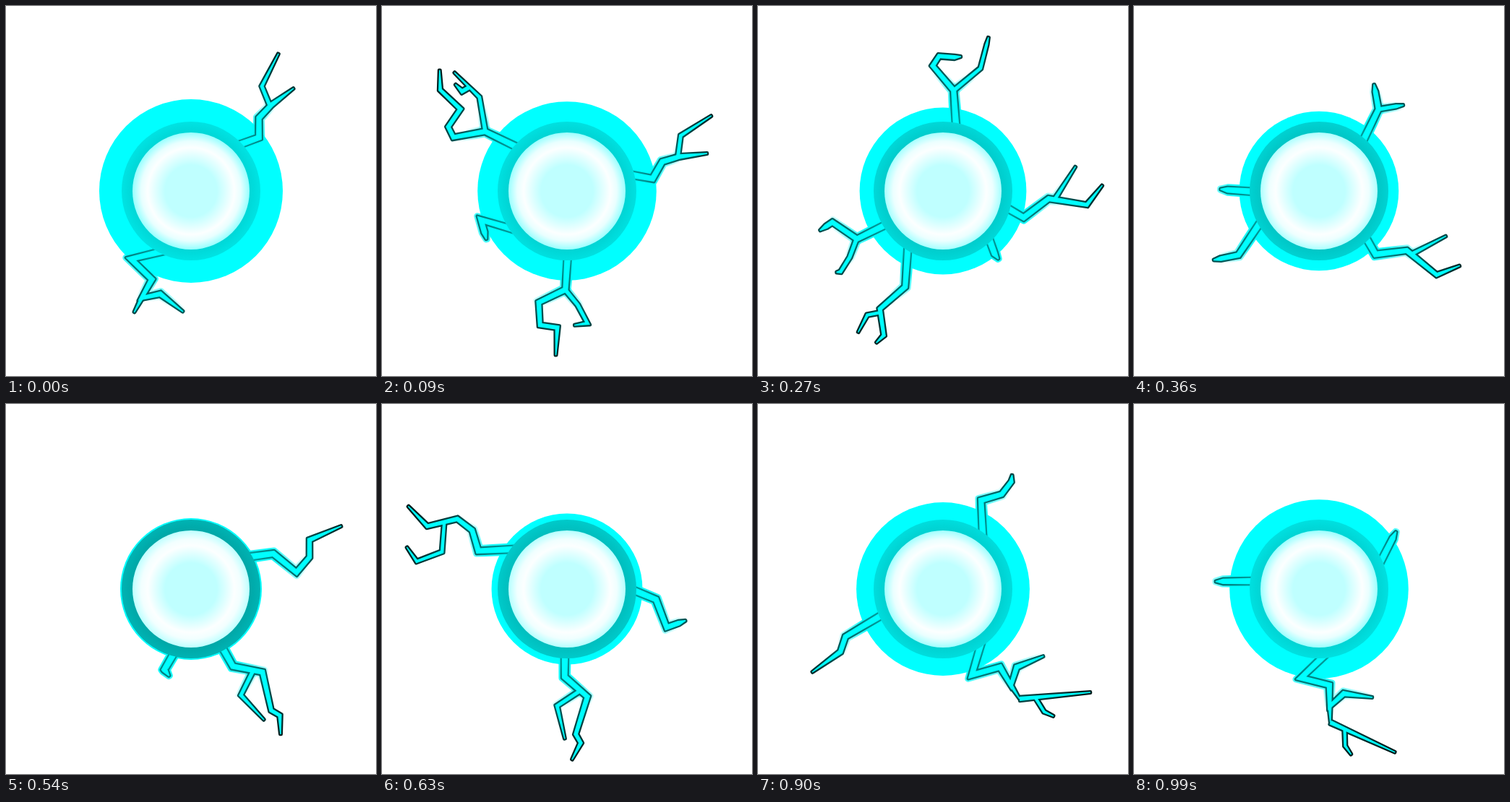
An HTML page with a canvas for the animation above (1.08 s loop, 512 by 512 pixels).

```html
<!DOCTYPE html>
<html lang="en">
<head>
<meta charset="utf-8">
<title>Energy orb</title>
<style>
  html, body { margin: 0; width: 100%; height: 100%; overflow: hidden; background: #fff; }
  canvas { display: block; width: 512px; height: 512px; }
</style>
</head>
<body>
<canvas id="stage" width="512" height="512"></canvas>
<script>
const ctx = document.getElementById('stage').getContext('2d');
const STEP = 90, COUNT = 12, MID = 256, TURN = Math.PI * 2;
const RING = 96, BALL = 81;

// Radial gradient around the orb: stops are [radius, colour].
function radial(outer, ...stops) {
  const g = ctx.createRadialGradient(0, 0, 0, 0, 0, outer);
  for (const [r, c] of stops) g.addColorStop(r / outer, c);
  return g;
}
const GLOW = radial(165, [122, 'rgba(0,255,255,.9)'], [142, 'rgba(0,255,255,.5)'], [165, 'rgba(0,255,255,0)']);
const EDGE = radial(245, [98, '#009c9c'], [150, '#006666'], [200, '#003838'], [245, '#001c1c']);

// All bolts turn with the orb. Each appears whole at step `start`, stays whole
// for `hold` steps and is cut back over `fade` more. `ref` is the step whose
// rotation its points use. A side limb begins with its place along the main one.
const bolts = [];
function bolt(ref, start, hold, fade, main, ...sides) {
  const trunk = toPoints(main);
  const limbs = sides.map(([along, ...rest]) => {
    const root = along * pathLength(trunk);
    return { root, pts: [pointAt(trunk, root), ...toPoints(rest)] };
  });
  bolts.push({ ref, start, hold, fade, trunk, limbs });
}

bolt(10, 10, 3, 1, [308,334, 296,375, 335,364, 350,389, 358,364, 395,349], [.63, 362,408]);
bolt(10, 10, 2, 0, [362,408, 460,399], [.22, 396,426, 409,432]);
bolt(0, 0, 2, 2, [328,190, 350,182, 350,155, 367,137, 398,114], [.64, 354,111, 377,66]);
bolt(2, 1, 2, 3, [224,165, 199,128, 157,113, 158,97, 185,84, 174,47, 187,23], [.22, 216,83, 203,36]);
bolt(2, 1, 2, 0, [211,64, 199,64, 196,51]);
bolt(2, 2, 3, 2, [346,232, 371,232, 388,192, 438,173, 443,139], [.49, 398,135]);
bolt(2, 2, 2, 2, [254,350, 277,397, 262,441, 285,470, 281,484], [.69, 251,457, 252,484]);
bolt(2, 1, 2, 2, [208,340, 186,373, 145,370, 131,398, 150,413, 129,445], [.23, 190,400, 189,429, 172,422]);
bolt(6, 5, 2, 2, [340,211, 370,207, 402,233, 420,212, 420,188, 464,169]);
bolt(6, 6, 2, 2, [301,340, 314,363, 355,371, 367,424, 379,431, 380,457], [.34, 325,403, 357,437]);
bolt(8, 7, 3, 2, [213,168, 176,149, 183,120, 173,96, 132,84, 123,47], [.65, 132,125, 95,119, 93,95]);
bolt(10, 9, 2, 1, [170,293, 121,322, 114,343, 75,371]);

function toPoints(flat) {
  const pts = [];
  for (let i = 0; i < flat.length; i += 2) pts.push({ x: flat[i] - MID, y: flat[i + 1] - MID });
  return pts;
}
function gap(a, b) { return Math.hypot(b.x - a.x, b.y - a.y); }
function pathLength(pts) {
  return pts.slice(1).reduce((sum, p, i) => sum + gap(pts[i], p), 0);
}
function pointAt(pts, d) {
  let i = 1;
  while (i < pts.length - 1 && d > gap(pts[i - 1], pts[i])) d -= gap(pts[i - 1], pts[i++]);
  const a = pts[i - 1], b = pts[i], u = d / gap(a, b);
  return { x: a.x + (b.x - a.x) * u, y: a.y + (b.y - a.y) * u };
}

// Keep the first `keep` pixels, ending in a short point.
function cut(pts, keep) {
  if (keep >= pathLength(pts)) return pts;
  const neck = Math.max(1, keep - 10);
  const kept = pts.filter((p, i) => pathLength(pts.slice(0, i + 1)) < neck);
  return [...kept, pointAt(pts, neck), pointAt(pts, keep)];
}

// Tapered shape around a spine; it narrows away from the orb.
function outline(pts, scale) {
  const p = pts.map(q => ({ ...q }));
  const dirs = p.slice(1).map((q, i) => Math.atan2(q.y - p[i].y, q.x - p[i].x));
  if (Math.hypot(p[0].x, p[0].y) < RING + 12) {
    p[0].x -= 8 * Math.cos(dirs[0]);
    p[0].y -= 8 * Math.sin(dirs[0]);
  }
  const left = [], right = [];
  p.forEach((q, i) => {
    const a = dirs[Math.max(0, i - 1)], b = dirs[Math.min(i, dirs.length - 1)];
    const half = Math.atan2(Math.sin(b - a), Math.cos(b - a)) / 2;
    const body = scale * (4.1 - 0.013 * (Math.hypot(q.x, q.y) - RING));
    const w = (i === p.length - 1 ? 0.7 : body) / Math.max(0.5, Math.cos(half));
    const nx = -Math.sin(a + half) * w, ny = Math.cos(a + half) * w;
    left.push([q.x + nx, q.y + ny]);
    right.unshift([q.x - nx, q.y - ny]);
  });
  const path = new Path2D();
  left.concat(right).forEach(([x, y]) => path.lineTo(x, y));
  path.closePath();
  return path;
}

function boltShapes(b, step) {
  const age = (step - b.start + COUNT) % COUNT;
  const left = Math.min(1, Math.max(0, (b.hold + b.fade - age) / (b.fade + 1)));
  if (!left) return [];
  const keep = left ** 1.34 * pathLength(b.trunk);
  const shapes = [outline(cut(b.trunk, keep), 1)];
  for (const { root, pts } of b.limbs) {
    const rest = left === 1 ? Infinity : keep - root;
    if (rest > 4) shapes.push(outline(cut(pts, rest), 0.75));
  }
  return shapes;
}

function drawBolts(step) {
  const all = bolts.map(b => ({ turn: (step - b.ref) * TURN / COUNT, shapes: boltShapes(b, step) }));
  const each = paint => all.forEach(({ turn, shapes }) => {
    ctx.save();
    ctx.rotate(turn);
    shapes.forEach(paint);
    ctx.restore();
  });
  ctx.lineJoin = 'round';
  for (const [style, width] of [[GLOW, 9], [EDGE, 4.6]]) {
    ctx.strokeStyle = style;
    ctx.lineWidth = width;
    each(s => ctx.stroke(s));
  }
  ctx.fillStyle = '#0ff';
  each(s => ctx.fill(s));
}

function disc(r, fill) {
  ctx.beginPath();
  ctx.arc(0, 0, r, 0, TURN);
  ctx.fillStyle = fill;
  ctx.fill();
}

function draw(step) {
  const u = Math.abs(1 - step * 2 / COUNT);
  const pulse = u * (1.4 - 0.4 * u);
  const tone = 174 + 48 * Math.sqrt(pulse);
  const teal = v => `rgb(0,${Math.round(v)},${Math.round(v)})`;
  const pale = v => `rgb(${Math.round(v)},255,255)`;
  ctx.setTransform(1, 0, 0, 1, 0, 0);
  ctx.fillStyle = '#fff';
  ctx.fillRect(0, 0, 512, 512);
  ctx.translate(MID, MID);
  disc(98 + 29 * pulse, '#0ff');
  drawBolts(step);
  disc(RING, radial(RING, [BALL, teal(tone - 7)], [RING, teal(tone + 5)]));
  disc(BALL, radial(BALL, [36, pale(191)], [60, pale(252)],
    [69, pale(242 - 10 * pulse)], [BALL, pale(190 - 40 * pulse)]));
}

const began = performance.now();
let shown = -1;
function tick() {
  const step = Math.floor((performance.now() - began) / STEP) % COUNT;
  if (step !== shown) draw(shown = step);
  requestAnimationFrame(tick);
}
tick();
</script>
</body>
</html>
```
